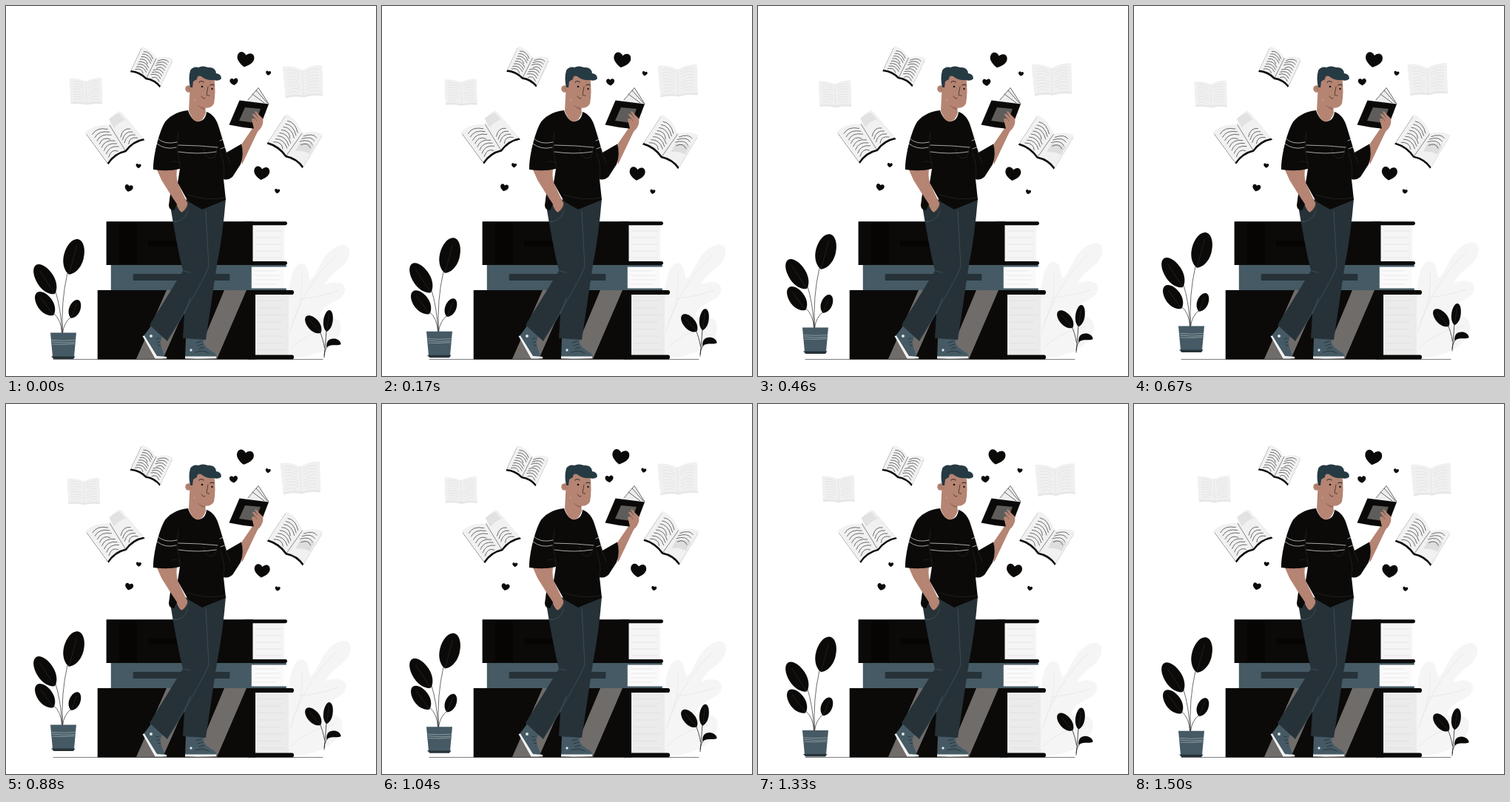
An HTML page that plays this animation: 500x500 px, repeating every 1.54 s.

```html
<!DOCTYPE html>
<html lang="en">
<head>
<meta charset="utf-8">
<title>Reader with floating books</title>
<style>
  html, body { margin: 0; width: 100%; height: 100%; overflow: hidden; background: #fff; }
  svg { display: block; width: 100vw; height: 100vh; }
</style>
</head>
<body>
<svg id="stage" viewBox="0 0 500 500"></svg>
<script>
const LOOP = 1540;
const BLACK = '#0b0a09', NAVY = '#263238', SLATE = '#455a64', SKIN = '#b58472';
const stage = document.getElementById('stage');
const movers = [];

const shape = (d, fill) => `<path d="${d}" fill="${fill}"/>`;
const line = (d, color, width = 0.6) =>
  `<path d="${d}" fill="none" stroke="${color}" stroke-width="${width}" stroke-linecap="round" stroke-linejoin="round"/>`;
const rect = (x, y, w, h, fill, r = 0) =>
  `<rect x="${x}" y="${y}" width="${w}" height="${h}" rx="${r}" fill="${fill}"/>`;
const dot = (x, y, r, fill) => `<circle cx="${x}" cy="${y}" r="${r}" fill="${fill}"/>`;
const mix = (a, b, t) => [a[0] + (b[0] - a[0]) * t, a[1] + (b[1] - a[1]) * t];

// Wraps parts in a group that swings by (dx, dy), farthest out at time peak.
function moving(content, dx, dy, peak = 385, grow = 0) {
  const id = 'mover' + movers.length;
  movers.push({ id, dx, dy, peak, grow });
  return `<g id="${id}">${content}</g>`;
}

// Open book: left and right are [outer top, outer bottom], spine is [top, bottom].
// span limits how much of the right page, from top to bottom, carries text.
function openBook(left, spine, right, { paper, ink, cover, rows = 8, bulge = 0.2, span = [0, 1], picture = '' }) {
  const up = [spine[0][0] - spine[1][0], spine[0][1] - spine[1][1]];
  const depth = 2.6 / Math.hypot(...up);
  const bend = (a, b, amount = bulge) => {
    const m = mix(a, b, 0.5);
    return [m[0] + up[0] * amount, m[1] + up[1] * amount];
  };
  const outline = ([top, bottom]) =>
    `M${top}Q${bend(top, spine[0])} ${spine[0]}L${spine[1]}Q${bend(bottom, spine[1], bulge * 0.75)} ${bottom}Z`;
  const text = ([top, bottom], [from, to]) => {
    let d = '';
    for (let i = 1; i <= rows; i++) {
      const v = i / (rows + 1);
      if (v < from || v > to) continue;
      const a = mix(top, bottom, v), b = mix(spine[0], spine[1], v);
      d += `M${mix(a, b, 0.2)}Q${bend(a, b)} ${mix(a, b, i % 4 ? 0.84 : 0.7)}`;
    }
    return line(d, ink, 0.75);
  };
  const pages = color => shape(outline(left) + outline(right), color);
  return `<g transform="translate(${-up[0] * depth} ${-up[1] * depth})">${pages(cover)}</g>` +
    pages(paper) + picture + text(left, [0, 1]) + text(right, span) + line(`M${spine[0]}L${spine[1]}`, ink, 0.6);
}

const heart = (x, y, width, turn) =>
  `<path transform="translate(${x} ${y}) rotate(${turn}) scale(${width / 23})" fill="${BLACK}"
    d="M0 10.500C-5 8-12 3-11.500-3C-11-10-4-11 0-5.500C4-11 11-10 11.500-3C12 3 5 8 0 10.500Z"/>`;

// Leaf with half width w and half height h, slightly pointed at the stem.
const leaf = (x, y, w, h, turn) =>
  `<g transform="translate(${x} ${y}) rotate(${turn})">` +
  shape(`M0 ${h}C${-w * 0.45} ${h * 0.93} ${-w} ${h * 0.55} ${-w} 0S${-w * 0.55} ${-h} 0 ${-h}S${w} ${-h * 0.55} ${w} 0S${w * 0.45} ${h * 0.93} 0 ${h}Z`, BLACK) +
  line(`M0 ${h}L0 ${-h * 0.6}`, '#35332f', 0.5) + '</g>';

// Page block of a closed book with faint sheet lines.
function pageBlock(x, y, w, h, fill, gap) {
  let d = '';
  for (let i = gap; i < h - 2; i += gap) d += `M${x + 4} ${y + i}h${w - 8 - (i * 7) % 9}`;
  return rect(x, y, w, h, fill) + line(d, '#d8dadb', 0.6);
}

function closedBooks() {
  return rect(135.6, 291.2, 198.4, 58.8, BLACK) + rect(153, 293, 24, 55, '#060504') + rect(192, 317, 40, 8, '#060504') +
    pageBlock(333.5, 295, 42.5, 51, '#f5f5f5', 9) +
    rect(320, 291.2, 60, 5, BLACK, 2.4) + rect(320, 345, 60, 5, BLACK, 2.4) +
    rect(141.8, 350, 190, 34, SLATE) + pageBlock(332, 352, 43.5, 29.5, '#fafafa', 6) +
    rect(325, 350, 54, 2.4, SLATE, 1) + rect(325, 381.4, 54, 2.6, SLATE, 1) +
    rect(171.7, 362, 130.6, 9, NAVY) +
    rect(123.7, 384, 213.3, 93.5, BLACK) +
    shape('M217 384H253L212 477H176ZM295 384H325L285 477H256Z', '#6f6c6a') +
    pageBlock(337, 389, 45.5, 83, '#ebebeb', 9.5) +
    rect(325, 384, 64, 6, BLACK, 2.8) + rect(325, 471.5, 64, 6, BLACK, 2.8);
}

function fern() {
  const leaves =
    shape('M383 475V388C383 365 390 347 400 348C408 349 408 361 411 370C424 360 426 330 453 323C469 321 466 343 454 352C445 360 436 365 431 377C445 370 459 374 458 384C457 399 436 398 425 414C421 425 430 421 440 421C456 422 456 440 446 451C432 470 404 476 383 475Z', '#f5f5f5') +
    line('M384 440Q402 378 447 336M387 428Q402 400 400 362M398 396Q428 392 448 385M386 462Q405 442 442 434', '#e4e4e4', 0.7);
  return '<g transform="translate(383 476)">' +
    moving(`<g transform="translate(-383 -476)">${leaves}</g>`, 0, 0, 705, 0.0115) + '</g>';
}

function plants() {
  const potted =
    line('M76.500 442Q74 400 83 361M76 442Q74 408 67 386M75.500 442Q75 424 64 415M76.500 442Q78 428 88 420', BLACK, 0.6) +
    leaf(91.5, 339, 13.5, 24.5, 15) + leaf(53.2, 369.5, 11.8, 23.2, -33) +
    leaf(53, 402.5, 10.5, 18.9, -36) + leaf(92.8, 409.5, 7.5, 13.1, 22) +
    shape('M60 441.500H95L92 474H63Z', SLATE) +
    line('M62 451.500Q77 453 93.500 451.500M62.500 454Q77 456 93 454.500M63 457Q78 458 92 456.500', '#b9c3c8', 0.6) +
    shape('M61 473.500H93.500L91 477H64.500Z', NAVY);
  const sprout =
    line('M430 475Q432 454 433 438M430.500 462Q428 448 424 440M430 472Q431 462 436 459', BLACK, 0.7) +
    leaf(415.5, 430.5, 8, 14.8, -41) + leaf(435.3, 425.5, 6.3, 14.6, 8) +
    shape('M433 461C433 452 437 449 444 449.500C449 450 453 454 452.500 457C448 460 440 456 433 461Z', BLACK);
  return moving(potted, 0, -4.6, 705) + moving(sprout, 0, -4.6, 705);
}

function man() {
  const shoes =
    shape('M198 430L214 443Q207 452 209 459L215 475L203 475L185 447Z', SLATE) +
    shape('M184.500 446L187 445.500L204 473L217 474V476.500H201.500Z', '#f2f2f2') +
    shape('M243 449H267Q266 456 270 461L283 470L284 475H242Z', SLATE) +
    shape('M242 473.500H284V476Q263 477 242 476.500Z', '#f2f2f2') +
    dot(196, 446, 2, '#dfe5e8') + dot(250, 465, 1.7, '#dfe5e8') +
    line('M203 450L207 449M204 454L208 454M205 458L209 459M257 455L264 453M259 459L266 457M261 463L268 461M256 468Q266 464 274 469', NAVY, 0.9);
  const trousers =
    shape('M222 262L297 260Q293 310 285 350L270 451L239 449L241 416L218 453L194 431L239 358Q230 320 222 270Z', NAVY) +
    line('M270 277L274 352Q270 366 219 451M240 358L249 360M241 416L249 395M225 291Q240 294 246 277', '#4c5e67', 0.6);
  const pocketArm =
    shape('M203 219L232 217Q229 227 232 239L246 268Q245 275 238 279Q234 278 230 267L210 235Z', SKIN) +
    line('M246 267Q244 275 238 279', NAVY, 1);
  const raisedArm =
    shape('M314 193L334 164L333 151Q337 142 342 143Q349 151 346 160L339 172L319 214Z', SKIN);
  const sweater =
    shape('M246 141C249 150 254 156 260 156C267 155 270 151 271 143C280 146 285 154 288 165C291 174 294 185 298 198L318 186.500Q322 200 317 214L306 231Q300 236 294 234L297 262L265 275L246 264L232 239L235 220Q220 224 199 221C199 200 207 172 213 160C218 150 232 142 246 141Z', BLACK) +
    shape('M222 254L231 268L227 276Q220 276 220 269Z', BLACK) +
    line('M233 170Q229 196 235 211V219M294 233Q297 217 290 199M267 193Q270 209 281 205Q286 199 284 191M296 196Q301 207 303 213M246 255Q270 264 296 259M224 211Q231 208 235 213', '#34322f', 0.5) +
    line('M205 179Q214 188 231 184M204 186Q215 195 230 191M233 188L262 189L286 191M233 197Q259 201 284 197M289 182L294 180M290 193L298 190', '#e9e9e9', 0.7);
  const head =
    shape('M249 103L247 142Q252 156 259 156.500Q267 155 270 144L268 128H255Z', SKIN) +
    shape('M250 94H281Q284 116 281 132Q276 140 266 137Q254 132 251 116Z', SKIN) +
    dot(247, 112, 4.8, SKIN) +
    shape('M258 133Q264 138 270 138Q267 143 258 133Z', '#946453') +
    shape('M249 110Q246 98 249 87Q253 81 260 83Q266 80 273 83Q283 82 284 91Q291 92 291 98Q288 102 280 100Q270 101 264 95Q258 93 258 99L253 102L252 110Z', '#263a43') +
    line('M261 103Q264 100 267 103M276 107Q279 105 281 107', '#2d312f', 1.1) +
    line('M273 109L271 120Q273 122 275 121M264 122Q266 126 269 125', '#3c2a25', 0.8) +
    dot(265, 109, 1.3, '#111') + dot(278.5, 112, 1.2, '#111') +
    line('M245 110Q248 110 248 114', '#8f6050', 0.7);
  const heldBook =
    shape('M326 129L341 110.500L355 133Z', '#eeeeee') +
    line('M327 127L341 110.500L355 132M338 114L353 131M333 119L349 131', '#2b2b2b', 0.7) +
    shape('M315.500 127.500L355 132.500L342 166.500Q322 165 301.500 160.500Z', BLACK) +
    shape('M323 137L344 139L337 158L315 155Z', '#5f5d5b');
  const fingers =
    shape('M332 153Q334 151 337 153L340 156L333 147Q333 144 337 147L341 151L336 143Q338 141 341 146L347 152Q349 160 342 168L335 166Z', SKIN);
  return shoes + trousers + pocketArm + raisedArm + sweater + head + heldBook + fingers;
}

const bright = { paper: '#f1f1f1', ink: '#3d3d3d', cover: BLACK };
const pale = { paper: '#f0f0f0', ink: '#e0e0e0', cover: '#e6e6e6' };

function flyingBooks() {
  const paleLeft = openBook([[86, 98], [87.5, 130]], [[108, 102], [109, 131]], [[129, 97], [130, 130]],
    { ...pale, bulge: 0.1 });
  const paleRight = openBook([[374, 82], [378, 122]], [[400.5, 87], [402, 121]], [[427, 80], [428, 119]],
    { ...pale, bulge: 0.13 });
  const top = openBook([[184, 55], [169, 87]], [[203, 71], [190, 97]], [[226, 72], [209, 108]], bright);
  const left = openBook([[107, 171], [137, 212]], [[140, 161], [161, 195]], [[154, 142], [186, 179]],
    { ...bright, span: [0.5, 1], picture: shape('M139 153Q145 147 153 145L161 154Q151 158 146 165Z', '#e2e2e2') });
  const right = openBook([[379, 146], [354, 184]], [[400, 172], [379, 202]], [[428, 174], [402, 217]],
    { ...bright, span: [0, 0.45], picture: shape('M397 185Q407 183 417 188L410 200Q402 195 391 196Z', '#dedede') });
  return moving(paleLeft, -2.5, 2.2, 610) + moving(paleRight, -2.5, -1.7, 610) +
    moving(top, 0.5, -1) + moving(left, -0.7, -1.2) + moving(right, -0.8, 1.6);
}

const hearts = () => [
  [323.5, 72, 23, 11, 1.3, 1],
  [308, 102, 11, -4, 1, 1],
  [354.5, 90.5, 7, 10, 0.9, 1],
  [345.5, 225.5, 21, 7, -1, 1],
  [366.5, 250, 7, 10, -1.2, 1.2],
  [166, 246, 11, 12, -1, -1.2],
  [179, 216, 7, 5, -0.8, -1.2],
].map(([x, y, size, turn, dx, dy]) => moving(heart(x, y, size, turn), dx, dy)).join('');

stage.innerHTML = rect(0, 0, 500, 500, '#fff') + fern() + line('M64 477.500H428', '#45474a', 0.7) +
  closedBooks() + man() + flyingBooks() + hearts() + plants();
for (const m of movers) m.node = document.getElementById(m.id);

function draw(now) {
  const wave = (t, peak) => Math.cos((t - peak) / LOOP * 2 * Math.PI);
  for (const { node, dx, dy, peak, grow } of movers) {
    const k = wave(now % LOOP, peak) - wave(0, peak);
    node.setAttribute('transform', `translate(${dx * k} ${dy * k}) scale(${1 + grow * k})`);
  }
  requestAnimationFrame(draw);
}
draw(performance.now());
</script>
</body>
</html>
```
